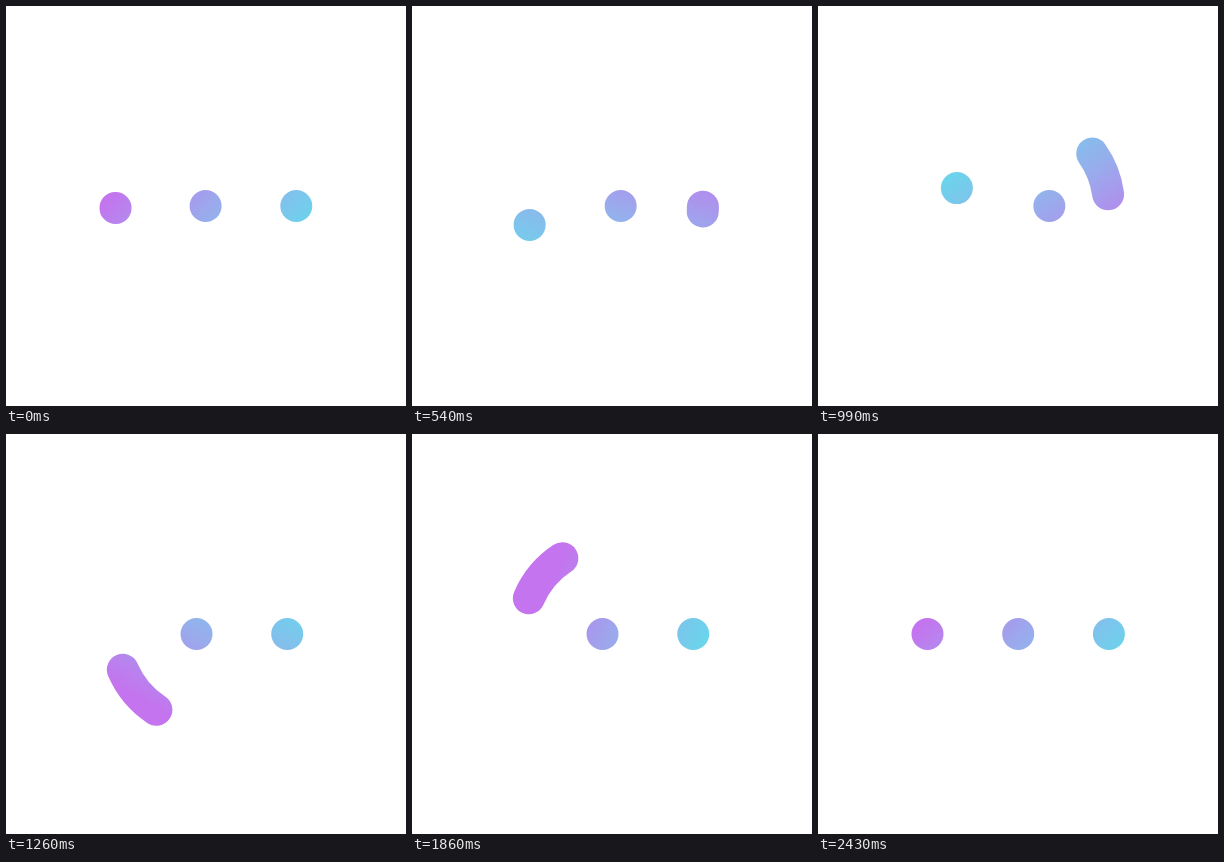
Write an HTML page that moves like this. It is 400 px wide and 400 px high and loops after 4460 ms.

```html
<!DOCTYPE html>
<html lang="en">
<head>
<meta charset="utf-8">
<title>Dot loader</title>
<style>
  html, body { margin: 0; width: 100%; height: 100%; overflow: hidden; background: #fff; }
  svg { display: block; width: 100%; height: 100%; }
</style>
</head>
<body>
<svg viewBox="0 0 400 400">
  <defs>
    <linearGradient id="tint" gradientUnits="userSpaceOnUse">
      <stop offset="0" stop-color="#c474ee"/>
      <stop offset=".5" stop-color="#97aeec"/>
      <stop offset="1" stop-color="#64daeb"/>
    </linearGradient>
  </defs>
  <g fill="none" stroke="url(#tint)" stroke-width="32" stroke-linecap="round">
    <path id="arc"/>
    <circle id="left" r="16" fill="url(#tint)" stroke="none"/>
    <circle id="right" r="16" fill="url(#tint)" stroke="none"/>
  </g>
</svg>
<script>
const LOOP = 4460, STEP = 30, BEAT = 600, BEATS = 4, LEAD = 4, SPIN = 2430;
const CX = 200.2, CY = 200, R = 90.7;
const PIVOT = 208, HALF = 87;
const get = id => document.getElementById(id);
const tint = get('tint'), arc = get('arc'), left = get('left'), right = get('right');

function set(el, attrs) {
  for (const key in attrs) el.setAttribute(key, attrs[key]);
}

// Cubic easing curve, solved by bisection
function bezier(x1, y1, x2, y2) {
  const at = (a, b, s) => 3 * (1 - s) * (1 - s) * s * a + 3 * (1 - s) * s * s * b + s * s * s;
  return x => {
    if (x <= 0) return 0;
    if (x >= 1) return 1;
    let lo = 0, hi = 1;
    for (let i = 0; i < 30; i++) {
      const mid = (lo + hi) / 2;
      if (at(x1, x2, mid) < x) lo = mid; else hi = mid;
    }
    return at(y1, y2, lo);
  };
}

const headEase = bezier(.167, .167, 0, 1);
const tailEase = bezier(.167, .167, .667, 1);
const spinEase = bezier(.333, 0, .38, 1);

// Point on the ring; turn 0 is the left slot, turn 1 the right slot
function ringPoint(turn, side) {
  const a = Math.PI * turn;
  return [CX - R * Math.cos(a), CY + side * R * Math.sin(a)];
}

function draw(time) {
  const t = Math.floor((time % LOOP) / STEP) * STEP;
  const beat = Math.min((t + LEAD) / BEAT, BEATS);
  const index = Math.min(Math.floor(beat), BEATS - 1);
  const u = beat - index;
  const side = index % 2 ? -1 : 1;

  // The first dot sweeps round to the far end
  const [hx, hy] = ringPoint(headEase(u), side);
  const [tx, ty] = ringPoint(tailEase(u), side);
  arc.setAttribute('d', `M${tx} ${ty}A${R} ${R} 0 0 ${side < 0 ? 1 : 0} ${hx} ${hy + .01}`);

  // The others slide one slot left; the leading one swings out before its turn
  const v = Math.max(0, 2 * u - 1);
  const swing = 28 * Math.sin(Math.PI * Math.pow(v, 1.3));
  const shift = R * u;
  set(left, { cx: CX - shift - 12 * v * (1 - v) * (1 - v), cy: CY + side * swing });
  set(right, { cx: CX + R - shift, cy: CY });

  const angle = Math.PI * (.25 + 2 * spinEase(t / SPIN));
  const dx = HALF * Math.cos(angle), dy = HALF * Math.sin(angle);
  set(tint, { x1: PIVOT - dx, y1: PIVOT - dy, x2: PIVOT + dx, y2: PIVOT + dy });
}

const start = performance.now();
function tick() {
  draw(performance.now() - start);
  requestAnimationFrame(tick);
}
draw(0);
requestAnimationFrame(tick);
</script>
</body>
</html>
```
